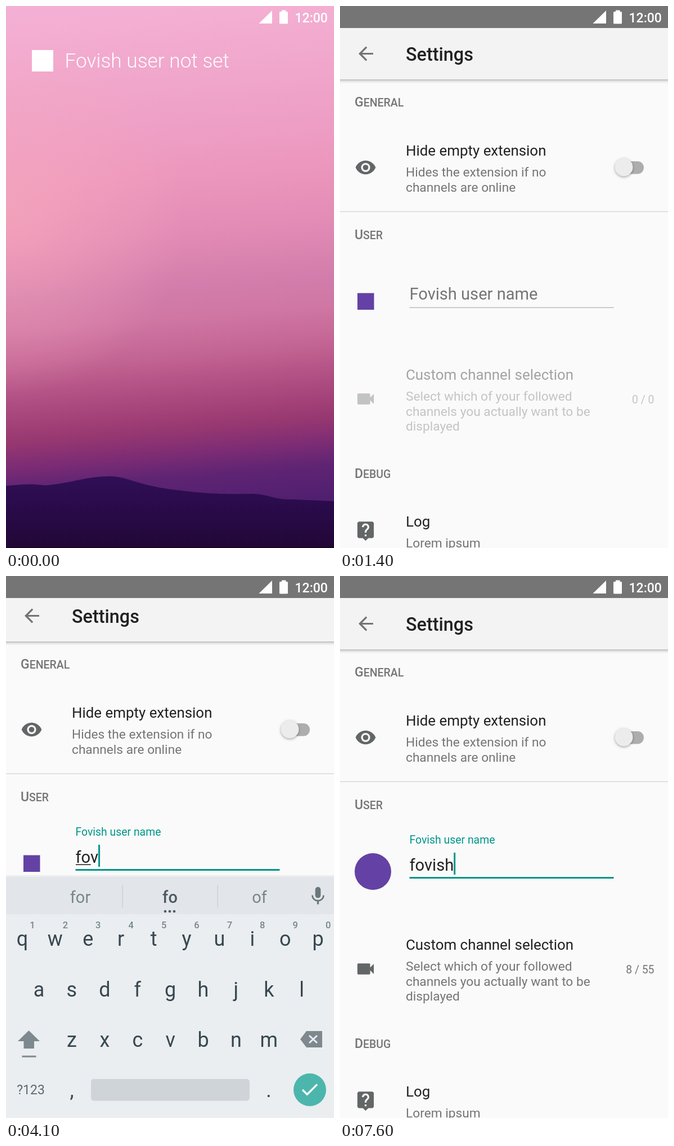
Recreate the animation shown at these times as an HTML page with a canvas. Size 583 by 960 pixels, loop 8000 ms.

```html
<!DOCTYPE html>
<html lang="en">
<head>
<meta charset="utf-8">
<title>Settings</title>
<style>
html, body { margin: 0; width: 100%; height: 100%; overflow: hidden; }
canvas { display: block; }
</style>
</head>
<body>
<canvas id="stage" width="583" height="960"></canvas>
<script>
const W = 583, H = 960, LOOP = 8000, STEP = 100;
const SCREEN = 1036, STATUS = 39, NAV = 78;
const TEAL = '#009688', PURPLE = '#6441a4', DARK = '#212121', GREY = '#757575', ICON = '#626666';
const NAME = 'fovish', LABEL = 'Fovish user name';
const KEY_TIMES = [3900, 4000, 4100, 4200, 4500, 4600];
const HINTS = [['', ''], ['for', 'from'], ['for', 'of'], ['forbid', 'for'],
  ['foil', 'folio'], ['folios', 'folio'], ['fovishing', 'fovishes']];

const ICONS = {
  back: 'M20 11H7.83l5.59-5.59L12 4l-8 8 8 8 1.41-1.41L7.83 13H20z',
  eye: 'M12 4.5C7 4.5 2.73 7.61 1 12c1.73 4.39 6 7.5 11 7.5s9.27-3.11 11-7.5c-1.73-4.39-6-7.5-11-7.5zM12 17a5 5 0 1 1 0-10 5 5 0 1 1 0 10zM12 9a3 3 0 1 0 0 6 3 3 0 1 0 0-6z',
  video: 'M17 10.5V7c0-.55-.45-1-1-1H4c-.55 0-1 .45-1 1v10c0 .55.45 1 1 1h12c.55 0 1-.45 1-1v-3.5l4 4v-11z',
  help: 'M19 2H5c-1.1 0-2 .9-2 2v14c0 1.1.9 2 2 2h4l3 3 3-3h4c1.1 0 2-.9 2-2V4c0-1.1-.9-2-2-2zm-6 16h-2v-2h2zm2.07-7.75l-.9.92C13.45 11.9 13 12.5 13 14h-2v-.5c0-1.1.45-2.1 1.17-2.83l1.24-1.26c.37-.36.59-.86.59-1.41 0-1.1-.9-2-2-2s-2 .9-2 2H8c0-2.21 1.79-4 4-4s4 1.79 4 4c0 .88-.36 1.68-.93 2.25z',
  mic: 'M12 14c1.66 0 3-1.34 3-3V5c0-1.66-1.34-3-3-3S9 3.34 9 5v6c0 1.66 1.34 3 3 3zm5.3-3c0 3-2.54 5.1-5.3 5.1S6.7 14 6.7 11H5c0 3.41 2.72 6.23 6 6.72V21h2v-3.28c3.28-.48 6-3.3 6-6.72z'
};
for (const k in ICONS) ICONS[k] = new Path2D(ICONS[k]);

const stage = document.getElementById('stage').getContext('2d');
const layer = document.createElement('canvas');
layer.width = W;
layer.height = H;
const keys = layer.getContext('2d');
let g = stage;

const clamp = v => Math.max(0, Math.min(1, v));
const lerp = (a, b, u) => a + (b - a) * u;

function rect(x, y, w, h, color) {
  g.fillStyle = color;
  g.fillRect(x, y, w, h);
}
function roundRect(x, y, w, h, r, color) {
  g.fillStyle = color;
  g.beginPath();
  g.roundRect(x, y, w, h, r);
  g.fill();
}
function circle(x, y, r, color) {
  g.fillStyle = color;
  g.beginPath();
  g.arc(x, y, r, 0, 7);
  g.fill();
}
function poly(points, color) {
  g.fillStyle = color;
  g.beginPath();
  points.forEach(p => g.lineTo(...p));
  g.fill();
}
function stroke(points, width, color) {
  g.strokeStyle = color;
  g.lineWidth = width;
  g.beginPath();
  points.forEach((p, i) => i % 2 ? g.lineTo(...p) : g.moveTo(...p));
  g.stroke();
}
function text(s, x, y, size, color, weight = 400, align = 'left') {
  g.font = `${weight} ${size}px Roboto, sans-serif`;
  g.fillStyle = color;
  g.textAlign = align;
  g.fillText(s, x, y);
  return g.measureText(s).width;
}
function icon(name, x, y, color) {
  g.save();
  g.translate(x, y);
  g.scale(1.62, 1.62);
  g.translate(-12, -12);
  g.fillStyle = color;
  g.fill(ICONS[name]);
  g.restore();
}
function gradient(grad, stops) {
  stops.forEach(([at, color]) => grad.addColorStop(at, color));
  return grad;
}

function home() {
  const sky = gradient(g.createLinearGradient(256, 0, 327, 890), [
    [0, '#f4b0d4'], [.11, '#f1a9cd'], [.24, '#ee9fc6'], [.34, '#ec97bd'], [.45, '#e38cb6'],
    [.56, '#d27dab'], [.62, '#d077a4'], [.69, '#c46695'], [.77, '#ad4c80'], [.84, '#983871'],
    [.89, '#7d2c74'], [.935, '#5f2473'], [1, '#511f70']]);
  rect(0, 0, W, H, sky);
  const glow = gradient(g.createRadialGradient(0, 370, 0, 0, 370, 320),
    [[0, 'rgba(248,170,188,.65)'], [1, 'rgba(248,170,188,0)']]);
  rect(0, 0, W, H, glow);
  const hill = gradient(g.createLinearGradient(0, 833, 0, H), [[0, '#300f56'], [.5, '#290a48'], [1, '#210736']]);
  g.fillStyle = hill;
  g.beginPath();
  g.moveTo(0, H);
  g.lineTo(0, 850);
  g.bezierCurveTo(50, 845, 55, 848, 70, 849);
  g.bezierCurveTo(120, 845, 140, 833, 185, 833);
  g.bezierCurveTo(215, 833, 230, 848, 300, 857);
  g.bezierCurveTo(370, 866, 400, 864, 440, 864);
  g.bezierCurveTo(465, 865, 480, 875, 510, 874);
  g.lineTo(W, 877);
  g.lineTo(W, H);
  g.fill();
  rect(0, 958, W, 2, '#180528');
  rect(46, 78, 38, 38, '#fff');
  text('Fovish user not set', 104.5, 109, 35.3, '#fff', 300);
}

// Blank window growing out of the widget while it fades in
function launch(t) {
  const p = 1 - Math.pow(1 - clamp((t - 900) / 300), 2.36);
  g.save();
  g.globalAlpha = t <= 900 ? (t - 400) / 500 * .38 : clamp(.38 + (t - 900) / 280);
  g.translate(lerp(11, 0, p), lerp(44, 0, p));
  g.scale(lerp(562, W, p) / W, lerp(222, SCREEN, p) / SCREEN);
  rect(0, 0, W, STATUS, GREY);
  rect(0, STATUS, W, SCREEN - NAV - STATUS, '#fafafa');
  rect(0, SCREEN - NAV, W, NAV, '#000');
  g.restore();
}

function statusIcons() {
  poly([[449.5, 31], [473, 31], [473, 8]], '#fff');
  roundRect(486, 10, 15, 21.5, 1.5, '#fff');
  rect(490, 7.5, 7.5, 4, '#fff');
  text('12:00', 513.5, 28.5, 23, '#fff', 500);
}

function heading(s, y) {
  const w = text(s[0], 26, y, 23, GREY, 500);
  text(s.slice(1).toUpperCase(), 26 + w, y, 19.5, GREY, 500);
}
function row(title, lines, y, titleColor, color) {
  text(title, 117, y, 25.9, titleColor);
  lines.forEach((s, i) => text(s, 117, y + 37 + i * 26.5, 22.7, color));
}

function field(t, typed, composed) {
  const busy = t >= 5000 && t < 5700;
  const focus = t >= 3100 && !busy;
  const float = clamp((t - 3100) / 300);
  const tint = busy ? '#cbcbcb' : float > 0 ? TEAL : GREY;
  text(LABEL, 123.5, lerp(519.5, 474, float), lerp(29.1, 19.4, float), tint);
  const w = text(typed, 123.5, 521.5, 29.1, busy ? '#9e9e9e' : DARK);
  if (t < 5000 && composed) rect(124, 524.5, g.measureText(composed).width, 1.5, DARK);
  if (focus) rect(123.5, 533, 363, 3, TEAL);
  else rect(123.5, 533.5, 363, 1.5, '#bdbdbd');
  const since = t >= 5600 ? t - 5600 : t >= 3900 ? 0 : t - 3100;
  if (focus && Math.floor(since / 500) % 2 === 0) rect(123.5 + w, 490, 3, 39, TEAL);
  if (busy) {
    const a = -1.22 + (t - 5200) / 1000 * 5;
    g.strokeStyle = TEAL;
    g.lineWidth = 3;
    g.beginPath();
    g.arc(541, 523.5, 12, a, a + 1.85 + Math.sin((t - 5200) / 250) * 1.3);
    g.stroke();
  }
}

function settings(t, pan, typed, composed) {
  const ready = t >= 5800;
  g.save();
  rect(0, 0, W, H, '#fafafa');
  g.translate(0, -pan);
  rect(0, 130, W, 7, gradient(g.createLinearGradient(0, 130, 0, 137),
    [[0, 'rgba(0,0,0,.27)'], [.4, 'rgba(0,0,0,.1)'], [1, 'rgba(0,0,0,0)']]));
  rect(0, 0, W, 130, '#f3f3f3');

  g.globalAlpha = t < 1400 ? .5 : 1;
  icon('back', 46, 84.5, '#737373');
  text('Settings', 117, 97, 32.4, DARK, 500);

  heading('General', 178);
  icon('eye', 45.5, 286, ICON);
  row('Hide empty extension', ['Hides the extension if no', 'channels are online'], 265, DARK, GREY);
  roundRect(494, 275, 46, 22.5, 11.2, '#adadad');
  g.save();
  g.shadowColor = 'rgba(0,0,0,.35)';
  g.shadowBlur = 4;
  g.shadowOffsetY = 1.5;
  circle(504.5, 285.5, 16, '#ececec');
  g.restore();
  rect(0, 363.5, W, 1.5, '#d9d9d9');

  heading('User', 413);
  if (ready) circle(58.5, 523.5, 32.5, PURPLE);
  else rect(31, 508.5, 29.5, 29.5, PURPLE);
  field(t, typed, composed);

  const dim = ready ? GREY : '#c4c4c4';
  icon('video', 45.5, 696, ready ? ICON : '#c2c3c3');
  row('Custom channel selection',
    ['Select which of your followed', 'channels you actually want to be', 'displayed'],
    662, ready ? DARK : '#a3a3a3', dim);
  const count = clamp((t - 5800) / 500);
  text(`${Math.round(8 * count)} / ${Math.round(55 * count)}`, 558.5, 704, 19.4, dim, 400, 'right');

  heading('Debug', 836);
  icon('help', 45.5, 929.5, ICON);
  row('Log', ['Lorem ipsum'], 922, DARK, GREY);
  g.restore();
  rect(0, 0, W, STATUS, GREY);
}

function keyboard(composed) {
  const ink = '#37474f', soft = '#78858b', n = composed.length;
  g.clearRect(0, 0, W, H);
  rect(0, 530, W, 3, 'rgba(0,0,0,.05)');
  rect(0, 533, W, 66, '#e2e6ea');
  rect(0, 599, W, H - 599, '#eaeef1');

  const [left, right] = HINTS[n];
  text(left, 132, 578.5, 29, soft, 400, 'center');
  text(composed, 291.5, 578.5, 29, '#4b5a62', n === NAME.length ? 700 : 500, 'center');
  text(right, 450.5, 578.5, 29, soft, 400, 'center');
  for (const x of [207, 376]) rect(x - .5, 547, 1.5, 40, '#ccd2d6');
  if (n) for (const x of [283, 291, 299]) circle(x, 594, 2.3, '#4b5a62');
  icon('mic', 554.5, 567, '#6a777d');

  [['qwertyuiop', 29, 655], ['asdfghjkl', 58.5, 744.5], ['zxcvbnm', 117, 834]].forEach(([row, x, y]) =>
    [...row].forEach((c, i) => text(c, x + i * 58.4, y, 36, ink, 400, 'center')));
  for (let i = 0; i < 10; i++) text((i + 1) % 10, 47 + i * 58.4, 624, 16.5, soft, 500, 'center');

  const grey = '#7d898e';
  poly([[21, 824], [40.5, 805], [60, 824], [50, 824], [50, 837], [31.5, 837], [31.5, 824]], grey);
  rect(28.5, 849.5, 25, 3, grey);
  poly([[523, 820.5], [534, 806], [562, 806], [562, 835], [534, 835]], grey);
  stroke([[539, 814], [553, 827], [553, 814], [539, 827]], 3, '#eaeef1');

  text('?123', 44, 918, 23, '#5c6a71', 400, 'center');
  text(',', 117, 923, 36, ink, 400, 'center');
  text('.', 467, 923, 36, ink, 400, 'center');
  roundRect(151, 891, 282, 38.5, 5, '#cfd4d8');
  circle(540, 910, 29, '#4db6ac');
  stroke([[527, 910], [536, 919], [534.5, 919], [553, 900.5]], 3.2, '#fff');
}

function draw(t) {
  const typedAt = time => NAME.slice(0, KEY_TIMES.filter(k => time >= k).length);
  const composed = typedAt(t - 100);
  // 0 = keyboard fully shown, 1 = hidden
  const hidden = t < 4900 ? Math.pow(clamp((3700 - t) / 600), 1.6) : clamp((t - 4900) / 500);
  if (t < 1300) {
    home();
    if (t >= 500) launch(t);
  } else {
    settings(t, 14 * Math.pow(1 - hidden, 1.8), typedAt(t), composed);
    if (hidden < 1) {
      g = keys;
      keyboard(composed);
      g = stage;
      g.globalAlpha = 1 - hidden;
      g.drawImage(layer, 0, 88 * hidden);
      g.globalAlpha = 1;
      if (t >= 5000) rect(0, 958, W, 2, '#4a4a4a');
    }
  }
  statusIcons();
}

function tick(now) {
  const t = now % LOOP;
  draw(t - t % STEP);
  requestAnimationFrame(tick);
}
requestAnimationFrame(tick);
</script>
</body>
</html>
```
